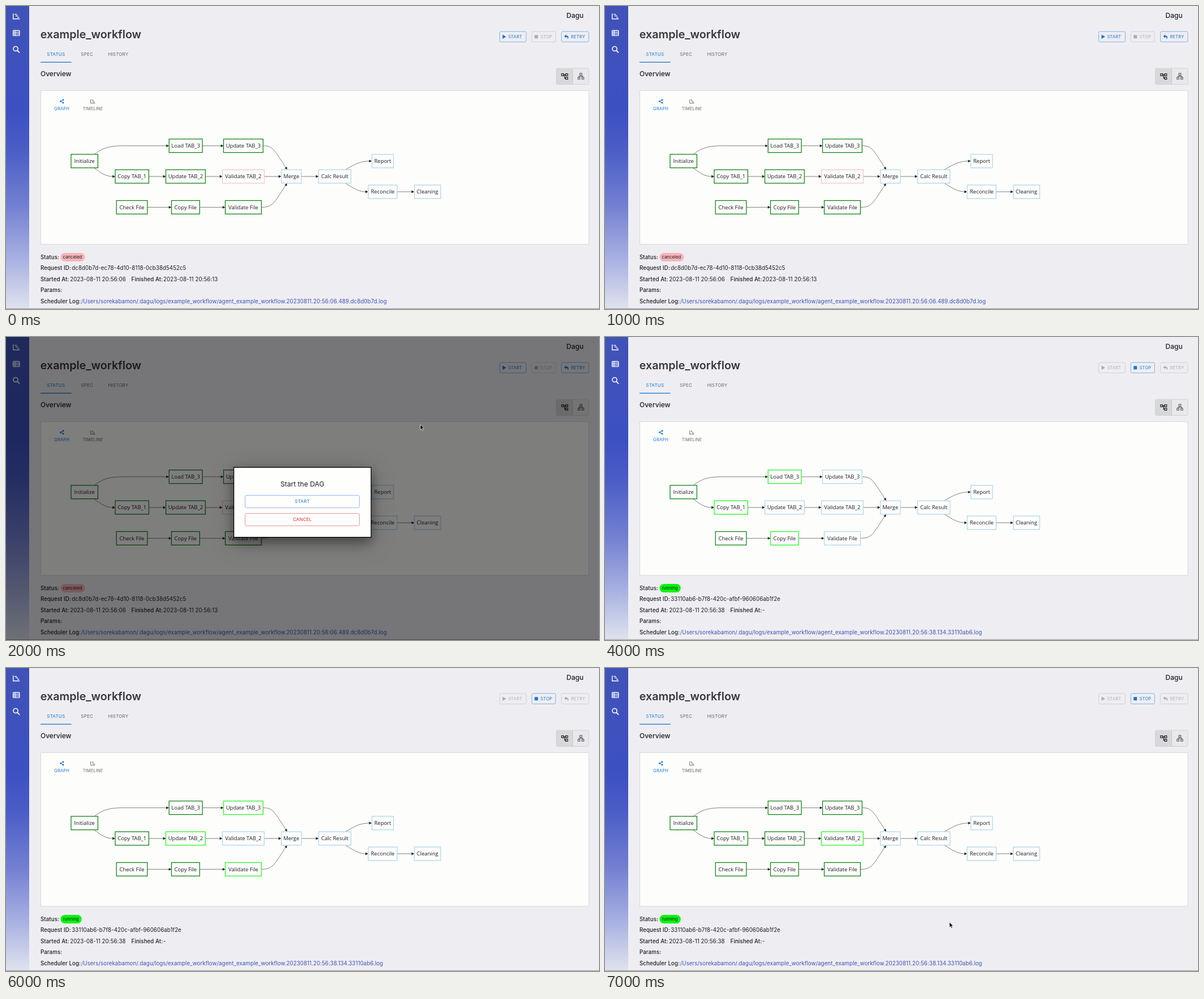
Recreate the animation shown at these times as an HTML page. Size 1048 by 535 pixels, loop 8000 ms.

```html
<!DOCTYPE html>
<html lang="en">
<head>
<meta charset="utf-8">
<title>Workflow status</title>
<style>
html, body { margin: 0; width: 100%; height: 100%; overflow: hidden; background: #eeeef2; }
svg { display: block; width: 1048px; height: 535px; font-family: Inter, sans-serif; font-optical-sizing: none; }
.node { font: 9.5px "Open Sans", "Noto Sans", sans-serif; }
.body { font-size: 9.68px; letter-spacing: .09px; }
.label { font-weight: 500; }
.caps { letter-spacing: .2px; }
.modal { filter: drop-shadow(0 9px 9px rgba(0,0,0,.3)) drop-shadow(0 6px 18px rgba(0,0,0,.25)); }
</style>
</head>
<body>
<svg id="stage" viewBox="0 0 1048 535">
  <defs>
    <linearGradient id="side" x1="0" y1="0" x2="0" y2="1">
      <stop offset="0" stop-color="#4053b7"/>
      <stop offset=".34" stop-color="#3c50c2"/>
      <stop offset=".47" stop-color="#4a5cc6"/>
      <stop offset=".66" stop-color="#7380d2"/>
      <stop offset=".84" stop-color="#a9b2e2"/>
      <stop offset="1" stop-color="#dfe3ee"/>
    </linearGradient>
  </defs>
</svg>
<script>
const LOOP = 8000;
const BLUE = '#1976d2', INK = '#1d1d1f', GREY = '#666668';
const IDLE = '#add8e6', DONE = '#0a800f', BUSY = '#22f522', FAIL = '#ffc0cb';
const stage = document.getElementById('stage');

function add(tag, attrs, parent = stage) {
  const el = document.createElementNS('http://www.w3.org/2000/svg', tag);
  for (const k in attrs) el.setAttribute(k, attrs[k]);
  parent.appendChild(el);
  return el;
}
function rect(x, y, x2, y2, attrs, parent) {
  return add('rect', { x, y, width: x2 - x, height: y2 - y, fill: 'none', ...attrs }, parent);
}
function text(str, x, y, attrs, parent) {
  const el = add('text', { x, y, fill: INK, ...attrs }, parent);
  el.textContent = str;
  return el;
}
function line(d, stroke, width = 1, parent) {
  return add('path', { d, stroke, 'stroke-width': width, fill: 'none' }, parent);
}
function shape(d, fill, parent) {
  return add('path', { d, fill }, parent);
}
function group(x = 0, y = 0, parent) {
  return add('g', { transform: `translate(${x} ${y})` }, parent);
}
const mid = (size, fill) => ({ 'font-size': size, fill, 'text-anchor': 'middle', class: 'caps' });

function chartIcon(x, y, color, scale) {
  const g = add('g', { transform: `translate(${x} ${y}) scale(${scale})` });
  line('M-5.5-5V4.5H6', color, 1.4, g);
  line('M-3-3.5H1M-1-.7H3M2 2H5', color, 1.5, g);
}

// Sidebar
rect(0, 0, 41, 535, { fill: 'url(#side)' });
chartIcon(18.2, 18.3, '#fff', 1);
rect(12.6, 43.2, 23.8, 52.4, { stroke: '#fff', 'stroke-width': 1.4, rx: 1 });
line('M12.5 46.4H24M12.5 49.4H24M16 43V52', '#fff', 1.2);
add('circle', { cx: 17, cy: 75.5, r: 4, fill: 'none', stroke: '#fff', 'stroke-width': 1.6 });
line('M20 78.5L24 82.6', '#fff', 1.8);

// Header
text('Dagu', 990.5, 20.6, { 'font-size': 12, 'font-weight': 500 });
text('example_workflow', 60.8, 57.4, { 'font-size': 19.7, 'font-weight': 600, fill: '#38383a' });
text('STATUS', 88.3, 88, mid(8, BLUE));
text('SPEC', 143.2, 88, mid(8, GREY));
text('HISTORY', 198.4, 88, mid(8, GREY));
rect(61, 98.6, 115.6, 99.9, { fill: BLUE });
text('Overview', 61, 123.7, { 'font-size': 12, 'font-weight': 500 });

function button(label, x, x2, textX, icon) {
  const box = rect(x, 45, x2, 63.4, { rx: 2.4, 'stroke-width': 1 });
  const g = group(x + 8, 54.2);
  shape(icon, 'inherit', g).removeAttribute('fill');
  text(label, textX, 57, { 'font-size': 7.5, class: 'caps' }, g.parentNode).removeAttribute('fill');
  const word = stage.lastChild;
  return on => {
    box.setAttribute('stroke', on ? '#84b2e2' : '#d2d2d5');
    g.setAttribute('fill', on ? BLUE : '#adadb0');
    word.setAttribute('fill', on ? BLUE : '#b0b0b3');
  };
}
const startBtn = button('START', 872.5, 919.4, 887.4, 'M-3-3.7L3.4 0L-3 3.7Z');
const stopBtn = button('STOP', 929.2, 971.4, 944.6, 'M-3-3H3V3H-3Z');
const retryBtn = button('RETRY', 981.6, 1030, 998.6,
  'M-3.2-.7L.4-4V-2C3.4-2 5 0 4.4 2C4.1 3.2 3.4 3.8 2.7 4C3.5 1.4 2.8.7.4.6V2.6Z');

// Layout toggle
rect(972.5, 110, 1030, 138.5, { rx: 2.4, fill: '#e9e9ec', stroke: '#d2d2d5' });
rect(973, 110.5, 1001.5, 138, { fill: '#d7d8d9' });
line('M1001.5 110V138.5', '#c8c8cb');
const wide = group(987.3, 124.2), tall = group(1016, 124.2);
rect(-5.4, -4.6, -1.8, -1, { stroke: '#222', 'stroke-width': 1.2 }, wide);
rect(1.8, -4.6, 5.4, -1, { stroke: '#222', 'stroke-width': 1.2 }, wide);
rect(1.8, 1.6, 5.4, 5.2, { stroke: '#222', 'stroke-width': 1.2 }, wide);
line('M-1.8-2.8H1.8M0-2.8V3.4H1.8', '#222', 1.2, wide);
rect(-1.8, -5.4, 1.8, -2, { stroke: '#666', 'stroke-width': 1.2 }, tall);
rect(-5.2, 1.8, -1.7, 5, { stroke: '#666', 'stroke-width': 1.2 }, tall);
rect(1.7, 1.8, 5.2, 5, { stroke: '#666', 'stroke-width': 1.2 }, tall);
line('M0-2V0M-3.5 1.8V0H3.5V1.8', '#666', 1.2, tall);

// Graph panel
rect(61.5, 149.5, 1030, 420.8, { fill: '#fdfdfc', stroke: '#d9d9db' });
line('M101 165.6L96.7 168.2L101 170.9', BLUE, 1);
for (const [cx, cy] of [[101, 165.7], [96.6, 168.2], [101, 170.8]]) add('circle', { cx, cy, r: 1.5, fill: BLUE });
chartIcon(153.4, 168.4, GREY, .68);
text('GRAPH', 98.6, 183.8, mid(7.5, BLUE));
text('TIMELINE', 153.7, 183.8, mid(7.4, GREY));

const EDGE = '#555';
[
  'M156 262C170 251 182 246.8 206 246.8H284', 'M156 286C168 295 176 301 189 301',
  'M347 246.8H381', 'M252.5 301H279', 'M352.5 301H379', 'M456.5 301H483', 'M522 301H549',
  'M250 355.4H289', 'M342.5 355.4H384', 'M691 328H718',
  'M454.5 246.8C472 246.8 474 254 495 286', 'M451.5 355.4C472 355.4 474 347 494.6 316',
  'M600 289C618 278 628 273.8 643 273.8', 'M600 313C616 323 624 328 637 328'
].forEach(d => line(d, EDGE, .75));

function arrow(x, y, angle = 0) {
  add('path', { d: 'M0 0L-4.8-2.4V2.4Z', fill: '#222', transform: `translate(${x} ${y}) rotate(${angle})` });
}
for (const x of [288, 384.5]) arrow(x, 246.8);
for (const x of [193, 282.5, 382.5, 486.5, 552.5]) arrow(x, 301);
for (const x of [292.5, 387.5]) arrow(x, 355.4);
for (const x of [640, 721.5]) arrow(x, 328);
arrow(646.5, 273.8);
arrow(497, 289, 56);
arrow(496.8, 313, -57);

// name, left, right, row centre, step at which it runs
const nodes = [
  ['Initialize', 115, 162.4, 273.8, 1], ['Check File', 195.2, 249.8, 355.4, 1],
  ['Load TAB_3', 288.2, 347, 246.8, 2], ['Copy TAB_1', 193, 252.4, 301, 2],
  ['Copy File', 292.5, 342.2, 355.4, 2], ['Update TAB_3', 384.5, 454.3, 246.8, 3],
  ['Update TAB_2', 282.5, 352.3, 301, 3], ['Validate File', 387.5, 451.4, 355.4, 3],
  ['Validate TAB_2', 382.5, 456.3, 301, 4], ['Merge', 486.6, 522, 301, 5],
  ['Calc Result', 552.5, 609.6, 301, 6], ['Report', 646.6, 684.8, 273.8, 7],
  ['Reconcile', 640.2, 691.2, 328, 7], ['Cleaning', 721.6, 768.2, 328, 8]
].map(([name, x, x2, y, step]) => {
  const box = rect(x, y - 11.9, x2, y + 11.9, { fill: '#fefefe', 'stroke-width': 1.25 });
  text(name, (x + x2) / 2, y + 3.4, { class: 'node', 'text-anchor': 'middle' });
  return { box, step };
});

// Details
const label = (str, x, y) => text(str, x, y, { class: 'body label' });
const value = (x, y, fill = INK) => text('', x, y, { class: 'body', fill });
label('Status:', 61, 446.6);
label('Request ID:', 61, 466.2);
label('Started At:', 61, 485.7);
const finishedLabel = label('Finished At:', 221.6, 485.7);
label('Params:', 61, 505.2);
label('Scheduler Log:', 61, 524.7);
const chip = rect(96.4, 436, 139.5, 451, { rx: 7.4 });
const chipText = text('', 100.4, 446.2, { 'font-size': 7.87 });
const request = value(116.3, 466.2);
const started = value(113.2, 485.7);
const finished = value(278, 485.7);
const log = value(132.8, 524.7, '#3f51b5');
rect(0, 533.8, 1048, 535, { fill: '#a5a3a6' });

// Dialog
const dialog = group();
rect(0, 0, 1048, 535, { fill: '#000', 'fill-opacity': .5 }, dialog);
rect(402.6, 230.2, 645.2, 353.6, { fill: '#fefefd', stroke: '#000', 'stroke-width': 1.3, class: 'modal' }, dialog);
text('Start the DAG', 523.7, 264.2, { 'font-size': 12.1, 'text-anchor': 'middle' }, dialog);
rect(422.6, 279.6, 624.6, 301.4, { rx: 2.4, stroke: '#8cbae8' }, dialog);
rect(422.6, 311.5, 624.6, 333.4, { rx: 2.4, stroke: '#e29797' }, dialog);
text('START', 523.7, 293.3, mid(8, BLUE), dialog);
text('CANCEL', 523.7, 325.3, mid(8, '#d32f2f'), dialog);

const cursor = group();
add('path', { d: 'M0 0V9.2L2.1 7.2L3.7 10.8L5.3 10.1L3.7 6.6H6.5Z', fill: '#000', stroke: '#fff', 'stroke-width': .7 }, cursor);

const runs = {
  old: { id: 'dc8d0b7d-ec78-4d10-8118-0cb38d5452c5', start: '20:56:06', end: '2023-08-11 20:56:13', ms: '489' },
  now: { id: '33110ab6-b7f8-420c-afbf-960606ab1f2e', start: '20:56:38', end: '-', ms: '134' }
};
// One entry per second
const last = { run: runs.old, step: 4, chip: '#f8b4ba' };
const scenes = [
  last, last,
  { ...last, dialog: true, cursor: [732.2, 154.6] },
  { run: runs.now, step: 1, chip: '#e6b4b4' },
  { run: runs.now, step: 2, chip: '#06f50e', live: true },
  { run: runs.now, step: 3, chip: '#06f50e', live: true },
  { run: runs.now, step: 3, chip: '#06f50e', live: true },
  { run: runs.now, step: 4, chip: '#06f50e', live: true, cursor: [608.8, 448.8] }
];

function nodeColor(step, scene) {
  if (step > scene.step) return IDLE;
  if (step < scene.step) return DONE;
  return scene.run === runs.old ? FAIL : BUSY;
}
function show(scene) {
  const { run, live } = scene, ended = run === runs.old;
  for (const n of nodes) n.box.setAttribute('stroke', nodeColor(n.step, scene));
  startBtn(!live);
  stopBtn(live);
  retryBtn(!live);
  chip.setAttribute('fill', scene.chip);
  chip.setAttribute('width', ended ? 43.1 : 37.4);
  chipText.textContent = ended ? 'canceled' : 'running';
  request.textContent = run.id;
  started.textContent = '2023-08-11 ' + run.start;
  finished.textContent = run.end;
  log.textContent = '/Users/sorekabamon/.dagu/logs/example_workflow/agent_example_workflow.20230811.'
    + `${run.start}.${run.ms}.${run.id.slice(0, 8)}.log`;
  dialog.style.display = scene.dialog ? '' : 'none';
  cursor.style.display = scene.cursor ? '' : 'none';
  if (scene.cursor) cursor.setAttribute('transform', `translate(${scene.cursor})`);
}

let current;
const begin = performance.now();
function tick() {
  const t = Math.max(0, performance.now() - begin) % LOOP;
  const scene = scenes[Math.floor(t / 1000)];
  if (scene !== current) show(current = scene);
  requestAnimationFrame(tick);
}
tick();
</script>
</body>
</html>
```
